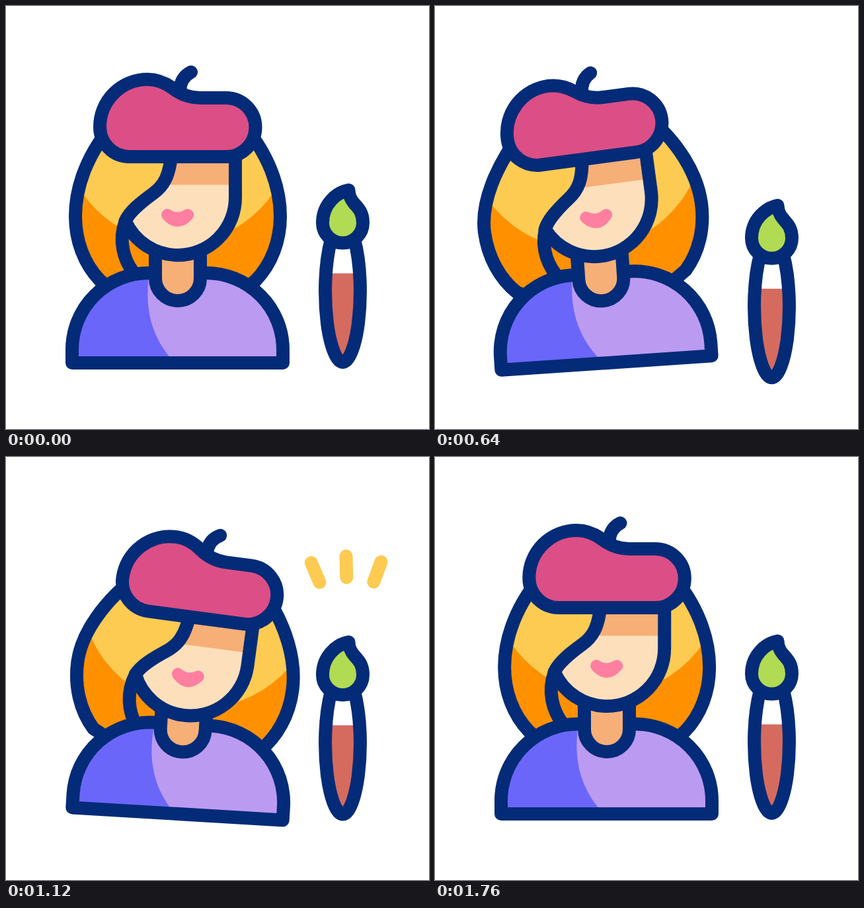
An HTML page that plays this animation: 640x640 px, repeating every 2000 ms.

```html
<!DOCTYPE html>
<html lang="en">
<head>
<meta charset="utf-8">
<title>Painter</title>
<style>
html, body { margin: 0; width: 100%; height: 100%; overflow: hidden; background: #fff; }
svg { display: block; width: 100vw; height: 100vh; }
.line { fill: none; stroke: #042b77; stroke-width: 20; stroke-linecap: round; stroke-linejoin: round; }
</style>
</head>
<body>
<svg viewBox="0 0 640 640">
  <defs>
    <path id="hairShape"/>
    <path id="faceShape" d="M347 220V290A87 87 0 0 1 260 377A87 87 0 0 1 180.5 325.3C187 311 203 298 221.500 284.500C238 273 248 258 250.500 220Z"/>
    <path id="handleShape" d="M492 353C482 390 481 440 486 480C490 511 499 539 509.500 539C520 539 529 511 533 480C538 440 537 390 527 353Z"/>
    <clipPath id="hairClip"><use href="#hairShape"/></clipPath>
    <clipPath id="faceClip"><use href="#faceShape"/></clipPath>
    <clipPath id="handleClip"><use href="#handleShape"/></clipPath>
  </defs>

  <g class="head">
    <use href="#hairShape" fill="#ff9100"/>
    <circle id="shine" cx="260" cy="184" fill="#fdcb52" clip-path="url(#hairClip)"/>
    <use href="#hairShape" class="line"/>
    <path class="line" d="M180.500 326C170 355 178 383 192 402"/>
  </g>

  <g id="body">
    <path fill="#6b66fa" d="M100 540V520A116 116 0 0 1 216 404H303V540Z"/>
    <path fill="#bb9af2" d="M217 404C209 455 219 498 250 534V540H419V520A116 116 0 0 0 303 404Z"/>
    <path class="line" d="M100 540V520A116 116 0 0 1 216 404H303A116 116 0 0 1 419 520V540Z"/>
    <path class="line" style="fill:#f6af76" d="M226 372V412A34 34 0 0 0 294 412V372"/>
  </g>

  <g class="head">
    <use href="#faceShape" fill="#fedfbc"/>
    <path fill="#f6af76" clip-path="url(#faceClip)" d="M170 215H350V270.500H170Z"/>
    <path fill="#ff7fa0" stroke="#ff7fa0" stroke-width="18" stroke-linejoin="round" d="M244 316Q260 326 275 316Q260 334 244 316Z"/>
    <use href="#faceShape" class="line"/>
    <path class="line" d="M263 128Q264 108 280 100"/>
    <path class="line" style="fill:#dc4e86" d="M187 228H333A44.500 44.500 0 0 0 333 139H294C279 139 265 134 253 125C241 116 228 111 214 111A72 72 0 0 0 142 183A45 45 0 0 0 187 228Z"/>
  </g>

  <path id="sparks" fill="none" stroke="#fdcb52" stroke-width="20" stroke-linecap="round"/>

  <g id="brush">
    <use href="#handleShape" fill="#fff"/>
    <path fill="#d56b5f" clip-path="url(#handleClip)" d="M470 404.500H550V550H470Z"/>
    <use href="#handleShape" class="line"/>
    <path class="line" style="fill:#b1db52" d="M518.500 278.500C500 282 479 300 479 328A30.500 30.500 0 0 0 540 328C540 312 533 306 527 299C521 292 519 287 518.500 278.500Z"/>
  </g>
</svg>
<script>
const LOOP = 2000, STEP = 40;
const $ = id => document.getElementById(id);
const heads = document.querySelectorAll('.head');

const progress = (t, from, to) => Math.min(1, Math.max(0, (t - from) / (to - from)));
const ease = (t, from, to) => (1 - Math.cos(Math.PI * progress(t, from, to))) / 2;
const bump = (t, from, peak, to) => ease(t, from, peak) - ease(t, peak, to);

// Lean left, then right, then back upright.
const lean = t => -5.3 * bump(t, 0, 520, 990) + 4 * bump(t, 520, 990, 1520);
const nod = t => 17 * bump(t, 0, 300, 700) + 15 * bump(t, 700, 980, 1600);
const puff = t => ease(t, 0, 480) - ease(t, 960, 1600);
const bob = t => -3 * bump(t, 0, 170, 520) + 39 * bump(t, 170, 520, 920)
  - 37 * bump(t, 520, 920, 1270) + 26 * bump(t, 920, 1270, 1720);

// The sides swell while the roots stay under the hat.
function hairPath(p) {
  const l = -16 * p, r = 5 * p;
  return `M168 172C${122 + l / 3} 222 ${105 + l} 275 ${105 + l} 318` +
    `C${105 + l} 355 ${118 + l} 390 ${142 + l} 415L160 430H360L${378 + r} 415` +
    `C${402 + r} 390 ${415 + r} 355 ${415 + r} 318C${415 + r} 275 ${398 + r / 3} 222 352 172Z`;
}

function sparkPath(t) {
  const tip = 80 * (1 - (1 - progress(t, 840, 1260)) ** 1.8);
  const tail = 80 * progress(t, 880, 1270) ** 1.6;
  if (tip <= tail) return '';
  return [-1, 0, 1].map(i => {
    const angle = (21.5 * i - 1.5) * Math.PI / 180;
    const point = d => `${516.3 + 27.5 * i + d * Math.sin(angle)} ${219 + 4.5 * i * i - d * Math.cos(angle)}`;
    return `M${point(tail)}L${point(tip)}`;
  }).join('');
}

function draw(now) {
  const t = Math.floor(now % LOOP / STEP) * STEP;
  const move = (el, value) => el.setAttribute('transform', value);
  const headTurn = 2.35 * (lean(t + 25) - lean(25));
  move($('body'), `rotate(${lean(t)} 260 540)`);
  heads.forEach(el => move(el, `translate(0 ${nod(t)}) rotate(${headTurn} 260 435)`));
  move($('brush'), `translate(0 ${bob(t)})`);
  $('hairShape').setAttribute('d', hairPath(puff(t)));
  $('shine').setAttribute('r', 175 + 6 * puff(t));
  $('sparks').setAttribute('d', sparkPath(t));
}

const start = performance.now();
function frame() {
  draw(performance.now() - start);
  requestAnimationFrame(frame);
}
frame();
</script>
</body>
</html>
```
